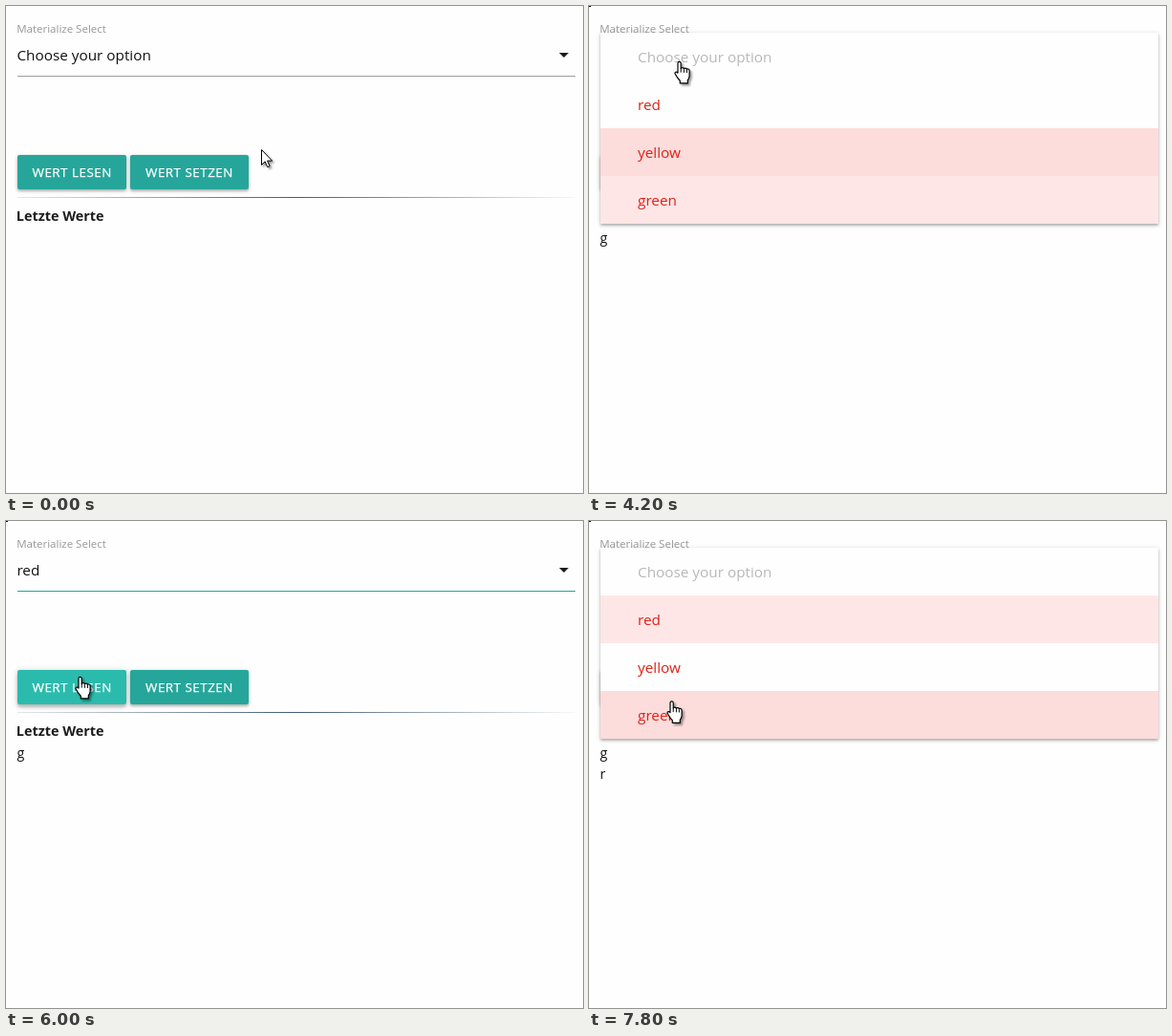
An HTML page that plays this animation: 604x510 px, repeating every 8000 ms.

```html
<!DOCTYPE html>
<html lang="de">
<head>
<meta charset="utf-8">
<title>Select</title>
<style>
  html, body { margin: 0; width: 100%; height: 100%; overflow: hidden; background: #fdfefd; }
  svg { display: block; font-family: "Open Sans", "Noto Sans", sans-serif; font-size: 15.3px; fill: #111; }
  .label { font-size: 11.5px; fill: #989898; }
  .cap { font-size: 13.4px; letter-spacing: .5px; fill: #fff; stroke: #fff; stroke-width: .25px; }
  .head { font-size: 14.4px; font-weight: 700; fill: #1c1c1c; }
  .log { font-size: 14.2px; }
  .opt { fill: #de2016; }
  .off { fill: #b8b8b8; }
  .raised { filter: drop-shadow(0 2px 1px rgba(0,0,0,.18)) drop-shadow(0 1px 2px rgba(0,0,0,.2)); }
  .hover { filter: drop-shadow(0 3px 1.5px rgba(0,0,0,.18)) drop-shadow(0 1px 3px rgba(0,0,0,.2)); }
  #cursor { filter: drop-shadow(2px 2px 1.2px rgba(0,0,0,.4)); }
  #cursor path { fill: #fff; stroke: #000; stroke-linejoin: round; }
</style>
</head>
<body>
<svg width="604" height="510" viewBox="0 0 604 510">
  <defs>
    <linearGradient id="fade">
      <stop offset="0" stop-color="#2c4a66" stop-opacity=".12"/>
      <stop offset=".5" stop-color="#2c4a66" stop-opacity=".9"/>
      <stop offset="1" stop-color="#2c4a66" stop-opacity=".03"/>
    </linearGradient>
    <clipPath id="clipRead"><rect x="12" y="156" width="114" height="36" rx="2"/></clipPath>
    <clipPath id="clipSet"><rect x="130" y="156" width="124" height="36" rx="2"/></clipPath>
  </defs>

  <rect id="dot" width="2" height="1" fill="#111"/>
  <text class="label" x="11.2" y="28">Materialize Select</text>
  <text id="value" x="11.4" y="57"></text>
  <path d="M579 49h10l-5 5z" fill="#1c1c1c"/>
  <rect id="line" x="12" y="73" width="584" height="1"/>

  <rect id="read" x="12" y="156" width="114" height="36" rx="2"/>
  <rect id="set" x="130" y="156" width="124" height="36" rx="2"/>
  <g clip-path="url(#clipRead)"><circle id="readWave" cx="80" cy="166" fill="#fff"/></g>
  <g clip-path="url(#clipSet)"><circle id="setWave" cx="184" cy="166" fill="#fff"/></g>
  <text class="cap" x="27.5" y="179">WERT LESEN</text>
  <text class="cap" x="146" y="179">WERT SETZEN</text>

  <rect x="12" y="200" width="584" height="1" fill="url(#fade)"/>
  <text class="head" x="10.8" y="225">Letzte Werte</text>
  <text class="log" id="log0" x="11.4" y="248"></text>
  <text class="log" id="log1" x="11.4" y="270"></text>

  <g id="panel">
    <rect class="raised" x="12" y="28" width="584" height="200" fill="#fdfefd"/>
    <rect id="picked" x="12" width="584" height="50" fill="#fee6e6"/>
    <rect id="lit" x="12" width="584" height="50" fill="#fddcdc"/>
    <text class="off" x="51" y="59">Choose your option</text>
    <text class="opt" x="51" y="109">red</text>
    <text class="opt" x="51" y="159">yellow</text>
    <text class="opt" x="51" y="209">green</text>
  </g>

  <g id="cursor">
    <path id="arrow" d="M.5 .5v16l3.7-3.6 2.5 5.8 2.4-1-2.5-5.6h5z"/>
    <g id="hand" transform="translate(-6.5 -.2)">
      <path stroke-width="1.2" d="M4.5 2.2c0-2.2 3.2-2.2 3.2 0v5.6c.3-1.5 3-1.4 3.2.3.4-1.2 2.8-1 3 .6.5-1 2.7-.6 2.7 1.2v5.6c0 2-1 3.3-1.8 4.6v3h-8v-2.6c-1.7-1.6-3.6-4.6-4.9-6.8-1.3-2.2 1-3.3 2.6-1.5z"/>
      <path d="M7.7 7.8v4M10.9 8.6v3.4M13.9 9.2v3"/>
    </g>
  </g>
</svg>
<script>
  const TICK = 200, LOOP = 8000;
  const OPTIONS = ["Choose your option", "red", "yellow", "green"];
  const FIELD = [112.5, 58.5], READ = [78, 163], SET = [184, 163.5], RED = [73, 99];

  // where the pointer stops: [tick, place]
  const stops = [
    [0, [267, 150]], [4, SET], [11, SET], [14, READ], [15, READ], [17, FIELD], [18, FIELD],
    [20, [98, 138]], [21, [95, 58]], [23, RED], [26, RED],
    [30, READ], [31, READ], [34, FIELD], [35, FIELD], [39, [87, 188.5]]
  ];
  const clicks = [6, 15, 18, 26, 31, 35];

  const $ = id => document.getElementById(id);
  const put = (id, name, v) => $(id).setAttribute(name, v);
  const show = (id, on) => put(id, "visibility", on ? "visible" : "hidden");
  const clamp = v => Math.max(0, Math.min(1, v));
  const easeOut = u => 1 - Math.pow(1 - u, 1.3);

  function pointAt(k) {
    const i = stops.findIndex(s => s[0] > k);
    if (i < 0) return stops[stops.length - 1][1];
    const [t0, a] = stops[i - 1], [t1, b] = stops[i];
    const u = easeOut((k - t0) / (t1 - t0));
    return a.map((v, n) => v + (b[n] - v) * u);
  }

  function targetAt([x, y], open) {
    if (open) return "row";
    if (y > 30 && y < 74) return "field";
    if (y < 156 || y > 192) return "";
    return x >= 12 && x <= 126 ? "read" : x >= 130 && x <= 254 ? "set" : "";
  }

  // replay the pointer and its clicks up to tick k
  function stateAt(k) {
    const s = { value: 0, lit: 0, open: false, toggled: -9, focus: "", log: [], clicked: {} };
    for (let i = 0; i <= k; i++) {
      const p = pointAt(i), row = Math.floor((p[1] - 28) / 50);
      s.point = p;
      if (s.open && row > 0) s.lit = row;
      if (clicks.includes(i)) {
        const hit = s.focus = targetAt(p, s.open);
        s.clicked[hit] = i;
        if (hit === "set") s.value = 3;
        if (hit === "read") s.log.push(OPTIONS[s.value][0]);
        if (hit === "row") s.value = s.lit;
        if (hit === "field") s.lit = 0;
        if (hit === "field" || hit === "row") {
          s.open = !s.open;
          s.toggled = i;
        }
      }
    }
    s.over = targetAt(s.point, s.open);
    return s;
  }

  function paintButton(id, s, k) {
    const over = s.over === id, age = k - s.clicked[id];
    put(id, "class", over ? "hover" : "raised");
    put(id, "fill", over ? "#2bbbad" : s.focus === id ? "#1d7d74" : "#26a69a");
    put(id + "Wave", "r", age < 3 ? 18 + 30 * age : 0);
    put(id + "Wave", "opacity", age < 3 ? .3 * (1 - age / 3) : 0);
  }

  function render(k) {
    const s = stateAt(k), change = clamp((k - s.toggled + 1) / 2);
    const alpha = s.open ? change : 1 - change;

    show("dot", k > 0);
    $("value").textContent = OPTIONS[s.value];
    show("value", alpha < 1);
    put("line", "fill", s.focus === "row" ? "#26a69a" : "#9e9e9e");
    paintButton("read", s, k);
    paintButton("set", s, k);
    for (const n of [0, 1]) $("log" + n).textContent = s.log[n] || "";

    put("panel", "opacity", alpha);
    put("picked", "y", 28 + 50 * s.value);
    put("lit", "y", 28 + 50 * s.lit);
    put("lit", "opacity", s.lit ? 1 : 0);

    put("cursor", "transform", `translate(${s.point})`);
    show("hand", s.over);
    show("arrow", !s.over);
  }

  const start = performance.now();
  function loop(now) {
    render(Math.floor((Math.max(0, now - start) % LOOP) / TICK));
    requestAnimationFrame(loop);
  }
  render(0);
  requestAnimationFrame(loop);
</script>
</body>
</html>
```
